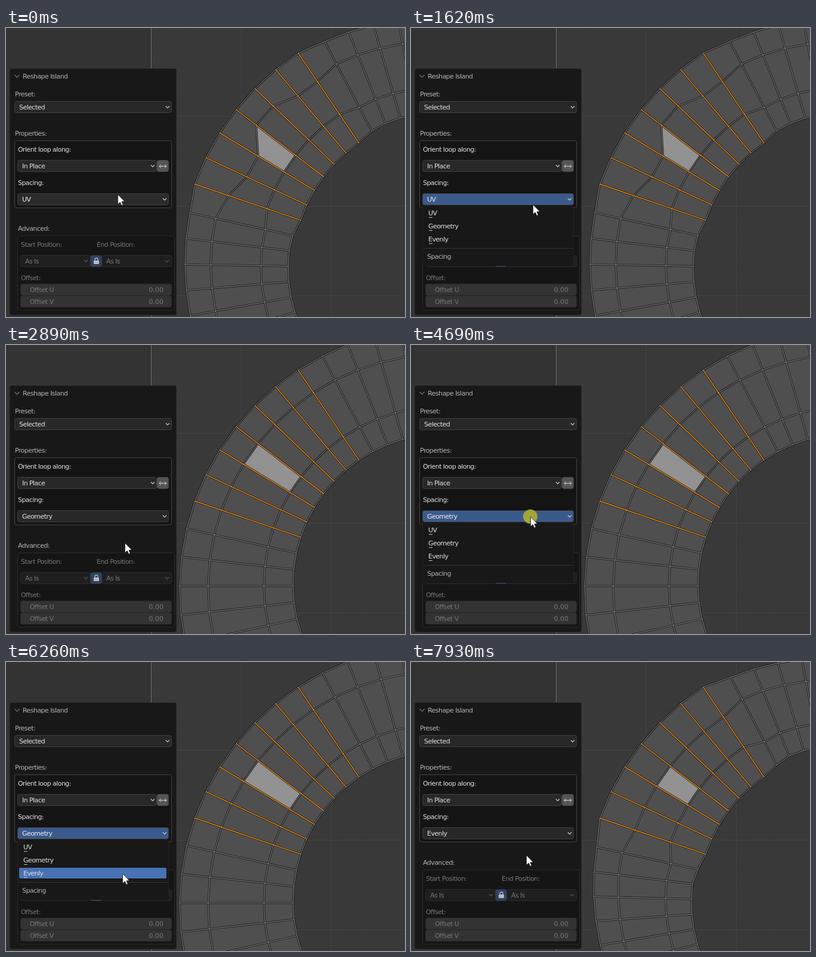
Recreate the animation shown at these times as an HTML page. Size 669 by 486 pixels, loop 8000 ms.

```html
<!DOCTYPE html>
<html lang="en">
<head>
<meta charset="utf-8">
<title>Reshape Island</title>
<style>
html, body { margin: 0; width: 100%; height: 100%; overflow: hidden; background: #333; }
svg { display: block; }
text { font: 11px "DejaVu Sans", sans-serif; letter-spacing: -.56px; fill: #b4b4b4; }
.hi { fill: #e2e2e2; }
.dim { fill: #777; }
.num { letter-spacing: 0; text-anchor: end; }
path { fill: none; }
.dark { stroke: #191919; stroke-width: 3; }
.lite { stroke: #8c8c8c; stroke-width: 1; }
.sel { stroke: #f28a10; stroke-width: 1.4; }
</style>
</head>
<body>
<svg width="669" height="486" viewBox="0 0 669 486">
  <rect x="243" width="426" height="486" fill="#393939"/>
  <path id="minor" stroke="#3b3b3b"/>
  <path id="major" stroke="#424242"/>
  <path d="M243.5 0V486" stroke="#707070"/>
  <g id="mesh"></g>
  <g id="panel"></g>
  <g id="menu">
    <rect x="19" y="298" width="254" height="102" fill="#181818"/>
    <path d="M19.5 298V400M272.5 298V400" stroke="#222"/>
    <path d="M20 370.5H272" stroke="#333"/>
    <rect id="row" x="22" width="247" height="18" rx="2" fill="#4772b3"/>
    <g id="items"></g>
  </g>
  <circle id="click" r="12" fill="#a3a53a"/>
  <path id="cursor" d="M0 0V16.5L3.8 13 6.3 18.5 8.8 17.4 6.4 12 11.5 11.7Z"
        style="fill:#fff;stroke:#111;stroke-width:.8"/>
</svg>
<script>
const $ = id => document.getElementById(id);
const LOOP = 8000;
const NAMES = ["UV", "Geometry", "Evenly"];

// Grid
const grid = (step, x0, y0) => {
  let d = "";
  for (let x = x0; x < 669; x += step) d += `M${x} 0V486`;
  for (let y = y0; y < 486; y += step) d += `M243 ${y}H669`;
  return d;
};
$("minor").setAttribute("d", grid(151 / 8, 243.5, 16.5));
$("major").setAttribute("d", grid(151, 394.5, 148.5));

// Panel: text, fields and chevrons are placed by their vertical centre
const text = (x, y, s, cls = "", id = "") => `<text x="${x}" y="${y + 4}" class="${cls}" id="${id}">${s}</text>`;
const box = (x, y, w, h, fill, stroke, id = "") =>
  `<rect x="${x + .5}" y="${y + .5}" width="${w - 1}" height="${h - 1}" rx="3" fill="${fill}" stroke="${stroke}" id="${id}"/>`;
const chevron = (x, y, color = "#ccc", s = 3) =>
  `<path d="M${x - s} ${y - s / 2}l${s} ${s} ${s} ${-s}" stroke="${color}" stroke-width="1.2"/>`;
const field = (x, y, w, label, id = "field", valueId = "") =>
  box(x, y - 10, w, 20, "#282828", "#404040", id) + text(x + 8, y, label, "hi", valueId) + chevron(x + w - 7, y);
const faint = x =>
  box(x, 382, 118, 20, "#1f1f1f", "#2b2b2b") + text(x + 8, 392, "As Is", "dim") + chevron(x + 110, 392, "#555");
const slider = (y, axis) => box(24, y - 10, 254, 20, "#333", "#2a2a2a")
  + text(40, y, "Offset " + axis, "dim") + text(264, y, "0.00", "dim num");

$("panel").innerHTML =
  box(6, 68, 280, 415, "#181818", "#222")
  + chevron(18.5, 81, "#777", 4) + text(28, 81, "Reshape Island")
  + text(15, 111, "Preset:")
  + field(14, 133, 264, "Selected", "preset")
  + text(15, 177, "Properties:")
  + box(14, 189, 264, 114, "#141414", "#454545")
  + text(20, 204, "Orient loop along:", "hi")
  + field(19, 232, 234, "In Place", "orient")
  + box(253, 222, 20, 20, "#545454", "#4a4a4a")
  + `<path d="M257 232.5h12m-3-3l3 3-3 3M260 229.5l-3 3 3 3" stroke="#ddd"/>`
  + text(20, 260, "Spacing:", "hi")
  + field(19, 288, 254, "", "spacing", "value")
  + text(20, 337, "Advanced:")
  + box(19, 349, 264, 126, "#151515", "#2b2b2b")
  + text(25, 364, "Start Position:", "dim") + text(152, 364, "End Position:", "dim")
  + faint(24) + faint(160)
  + box(141, 382, 20, 20, "#30415f", "#2b3a52")
  + `<rect x="147" y="391" width="9" height="6" rx="1" fill="#bbb"/>
     <path d="M149 391v-1.5a2.5 2.5 0 0 1 5 0v1.5" stroke="#bbb" stroke-width="1.3"/>`
  + text(25, 420, "Offset:", "dim")
  + slider(440, "U") + slider(460, "V");

$("items").innerHTML = NAMES.map((name, i) => {
  const y = 311 + 22 * i;
  return text(29, y, name, "hi") + `<path d="M30 ${y + 7.5}h6" stroke="#bbb"/>`;
}).join("") + text(27, 384, "Spacing");

// Ring mesh: spokes 3..9 are pinned, those beyond relax with distance
const FIRST = -4, LAST = 14, LOW = 3, HIGH = 9, MIDDLE = 5.5;
const pinned = k => k >= LOW && k <= HIGH;
const angleOf = k => (6.32 - .01 * k) * k;
const RELAX = {
  UV: { gap: .6, pitch: 5.75, sink: 4, slope: 1.6, rise: 8 },
  Evenly: { gap: .8, pitch: 5.55, sink: 5.5, slope: 3.2, rise: 11 }
};

// Where the two middle loops cross a spoke, as fractions of its length
function cuts(mode, k) {
  if (mode === "Geometry") return [.251, .743];
  if (!pinned(k)) return [.25, .735];
  if (mode === "Evenly") return [1 / 3, 2 / 3];
  const bend = Math.abs(k - MIDDLE) < 2 ? .088 * Math.sign(MIDDLE - k) : 0;
  return [.318 + bend, .68];
}

function spoke(mode, k) {
  let angle = angleOf(k), outer = 443 - .6 * k, inner = 253 + .25 * k;
  const relax = RELAX[mode];
  if (relax && !pinned(k)) {
    const edge = k < LOW ? LOW : HIGH, d = Math.abs(k - edge);
    angle = angleOf(edge) + Math.sign(k - edge) * (relax.gap + relax.pitch * d);
    outer -= relax.sink + relax.slope * d;
    inner += Math.min(6 * d, relax.rise);
  }
  const a = angle * Math.PI / 180;
  return [0, ...cuts(mode, k), 1].map(f => {
    const r = outer + (inner - outer) * f;
    return [734.2 - r * Math.cos(a), 405.2 - r * Math.sin(a)];
  });
}

function drawMesh(mode) {
  const spokes = [];
  for (let k = FIRST; k <= LAST; k++) spokes.push(spoke(mode, k));
  const line = pts => "M" + pts.map(p => p.map(v => v.toFixed(1)).join(" ")).join("L");
  const loops = [0, 1, 2, 3].map(j => spokes.map(s => s[j]));
  const isPinned = (s, i) => pinned(i + FIRST);
  const edges = loops.concat(spokes.filter((s, i) => !isPinned(s, i))).map(line).join("");
  const chosen = spokes.filter(isPinned).map(s => line([s[0], s[3]])).join("");
  const c = spokes[5 - FIRST], d = spokes[6 - FIRST];
  const stroke = (cls, path) => `<path class="${cls}" d="${path}"/>`;
  $("mesh").innerHTML =
    `<path d="${line([...loops[0], ...[...loops[3]].reverse()])}Z" style="fill:#4f4f4f"/>`
    + `<path d="${line([c[1], c[2], d[2], d[1]])}Z" style="fill:#929292"/>`
    + stroke("dark", edges + chosen) + stroke("lite", edges) + stroke("sel", chosen);
}

// Pointer moves: start, end, steps, x, y
const MOVES = [
  [70, 340, 4, 206, 288], [1550, 1960, 7, 200, 332], [2160, 2160, 1, 200, 333],
  [4010, 4290, 5, 201, 289], [5160, 5510, 6, 196, 356], [7720, 7930, 4, 194, 325]];
const CLICKS = [[740, 870], [2490, 2820], [4690, 4890], [5910, 6260]];
const OPEN = [[740, 2890], [4690, 6330]];
const within = (spans, t) => spans.some(([a, b]) => t >= a && t < b);
const show = (id, on) => $(id).setAttribute("visibility", on ? "inherit" : "hidden");

function pointer(t) {
  let x = 188, y = 280;
  for (const [a, b, n, tx, ty] of MOVES) {
    if (t < a) break;
    const gap = (b - a) / (n - 1) || 1;
    const f = Math.min(n, Math.floor((t - a) / gap + 1.05)) / n;
    const e = f * f * (3 - 2 * f);
    x += (tx - x) * e;
    y += (ty - y) * e;
  }
  return [Math.round(x), Math.round(y)];
}

let current;
function render(t) {
  const mode = NAMES[t < 2890 ? 0 : t < 6330 ? 1 : 2];
  if (mode !== current) {
    drawMesh(current = mode);
    $("value").textContent = mode;
  }
  const [x, y] = pointer(t), open = within(OPEN, t), row = Math.floor((y - 300) / 22);
  const hover = y >= 278 && y < 298;
  $("spacing").setAttribute("fill", open ? "#3b5a8c" : hover ? "#2b2b2b" : "#282828");
  $("value").style.fill = open || hover ? "#f0f0f0" : "";
  show("menu", open);
  show("row", open && row >= 0 && row < 3);
  $("row").setAttribute("y", 302 + 22 * row);
  show("click", within(CLICKS, t));
  $("click").setAttribute("transform", `translate(${x - 1} ${y - .5})`);
  $("cursor").setAttribute("transform", `translate(${x - .5} ${y})`);
}

const start = performance.now();
function frame() {
  render((performance.now() - start) % LOOP);
  requestAnimationFrame(frame);
}
frame();
</script>
</body>
</html>
```
